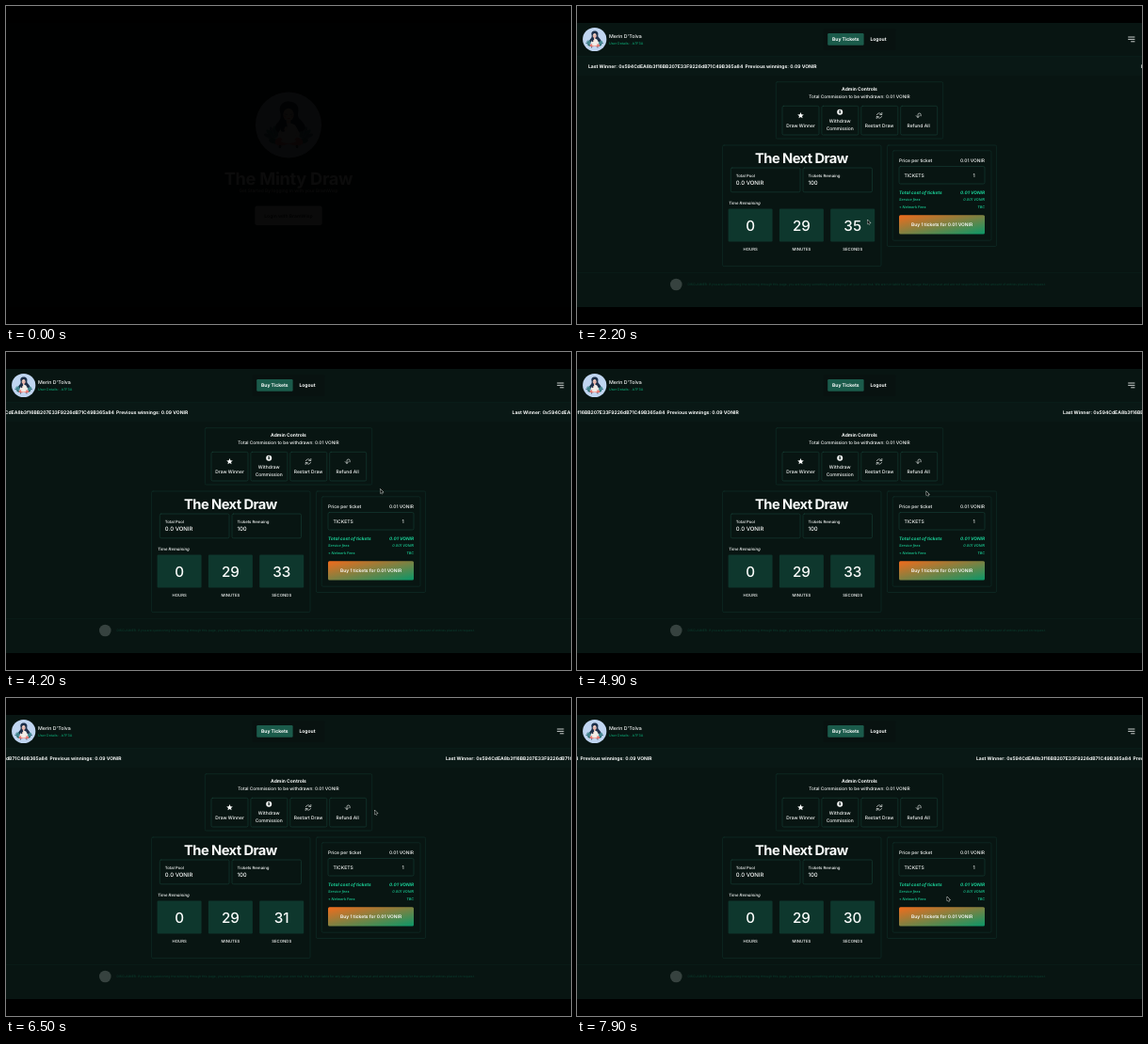
Write an HTML page with a canvas that moves like this. It is 600 by 338 pixels and loops after 8000 ms.

```html
<!DOCTYPE html>
<html lang="en">
<head>
<meta charset="utf-8">
<title>The Minty Draw</title>
<style>
html, body { margin: 0; width: 100%; height: 100%; overflow: hidden; background: #000; }
canvas { display: block; width: 600px; height: 338px; }
</style>
</head>
<body>
<canvas id="stage"></canvas>
<script>
const W = 600, H = 338, LOOP = 8000, SWITCH = 1800;
const cv = document.getElementById('stage');
const c = cv.getContext('2d');
const dpr = window.devicePixelRatio || 1;
cv.width = W * dpr;
cv.height = H * dpr;

const COIN = 'VONIR';
const WINNER = 'Last Winner: 0x594CdEA8b3f16BB207E33F9226dB71C49B365a84';
const PREVIOUS = 'Previous winnings: 0.09 ' + COIN;
const NOTE = 'DISCLAIMER: If you are questioning the winning through this page, you are buying something and playing it at ' +
  'your own risk. We are not liable for any usage that you have and are not responsible for the amount of entries placed on request.';
const WHITE = '#f9fbfa', LINE = '#10322a', EDGE = '#174036', GREEN = '#1ad097', BG = '#081512';

// Cursor stops: time, x, y
const STOPS = [
  [0, 309, 279], [900, 308, 241.5], [1400, 308.5, 227.5], [2300, 308.5, 227.5],
  [3600, 396, 149], [4200, 397.5, 146], [5500, 350, 150], [5700, 350, 150],
  [6500, 391.5, 119.5], [7800, 393, 211.5], [8000, 393, 211.5]
];

const clamp = v => Math.max(0, Math.min(1, v));
const smooth = v => v * v * (3 - 2 * v);

function text(s, x, y, size, { weight = 500, color = WHITE, align = 'left', italic = false, tight = 0 } = {}) {
  c.font = `${italic ? 'italic ' : ''}${weight} ${size}px Inter, sans-serif`;
  c.letterSpacing = `${-tight * size}px`;
  c.fillStyle = color;
  c.textAlign = align;
  c.textBaseline = 'alphabetic';
  c.fillText(s, x, y + size * 0.364);
}

function box(x, y, r, b, { fill, line, radius = 1.5, width = 0.6 } = {}) {
  c.beginPath();
  c.roundRect(x, y, r - x, b - y, radius);
  if (fill) { c.fillStyle = fill; c.fill(); }
  if (line) { c.strokeStyle = line; c.lineWidth = width; c.stroke(); }
}

function oval(x, y, rx, ry, color, turn = 0) {
  c.fillStyle = color;
  c.beginPath();
  c.ellipse(x, y, rx, ry, turn, 0, Math.PI * 2);
  c.fill();
}

function shape(path, color) {
  c.fillStyle = color;
  c.fill(new Path2D(path));
}

function stroke(path, color, width) {
  c.strokeStyle = color;
  c.lineWidth = width;
  c.lineCap = c.lineJoin = 'round';
  c.stroke(new Path2D(path));
}

function plant(side) {
  c.save();
  c.scale(side, 1);
  for (let i = 0; i < 5; i++) {
    const a = -0.3 + i * 0.36;
    oval(14 + Math.sin(a) * 7, 16 - Math.cos(a) * 9, 2.1, 6.4, i % 2 ? '#2f8583' : '#3b6d86', a);
  }
  for (let i = 0; i < 4; i++) {
    const a = i * 0.4;
    stroke(`M13 17L${13 + Math.sin(a) * 11} ${17 - Math.cos(a) * 13}`, '#8cc4be', 0.5);
  }
  oval(16, 17, 5, 2.6, '#27706f', -0.3);
  c.restore();
}

// Seated figure in a round picture, 35 units in radius
function portrait(x, y, r) {
  c.save();
  c.translate(x, y);
  c.scale(r / 35, r / 35);
  oval(0, 0, 35, 35, '#c3d7f2');
  c.beginPath();
  c.arc(0, 0, 35, 0, Math.PI * 2);
  c.clip();
  c.fillStyle = '#aac4e8';
  for (let j = -12; j <= 12; j++)
    for (let i = -12; i <= 12; i++)
      c.fillRect(i * 3 + (j % 2) * 1.5, j * 3, 0.9, 0.9);
  plant(-1);
  plant(1);
  shape('M-9 -14C-11 -22 -4 -26 1 -25C9 -25 12 -18 10 -12C9 -7 15 -5 17 0C20 5 14 8 10 7L-8 8C-16 8 -15 0 -11 -3C-8 -6 -8 -10 -9 -14Z', '#1d2f49');
  oval(0, -2, 2.4, 5, '#eeb9aa');
  oval(0, -11, 5.6, 6.8, '#f3cabd');
  shape('M-7 -10C-6 -18 -2 -19 2 -18C5 -17 7 -14 7 -9C10 -14 8 -21 1 -22C-6 -22 -9 -16 -7 -10Z', '#1d2f49');
  oval(-4, -9, 1.4, 1, '#ea8d88');
  oval(4, -9, 1.4, 1, '#ea8d88');
  stroke('M-4 -11.5L-1.6 -11M2 -11L4 -11.5', '#33405a', 0.6);
  stroke('M-0.9 -7L1.3 -7', '#d8514f', 0.9);
  shape('M-6 0Q0 -4 7 0L12 9L10 18L-10 18L-11 9Z', '#f3eee9');
  stroke('M-7 3Q-10 10 -3 15M8 3Q11 10 4 15', '#d8d3d3', 0.8);
  oval(-5, 2, 3.4, 5.5, '#1d2f49', 0.3);
  oval(-3, 4, 1.5, 2.5, '#f2c6b8', 0.4);
  shape('M-9 13Q-16 15 -14 20Q-10 24 0 20Q11 24 15 20Q17 15 9 13Q4 18 0 18Q-4 18 -9 13Z', '#e57770');
  oval(0, 17, 8, 2.6, '#f1e6df');
  oval(-9, 23, 1.4, 1.8, '#333e50', 0.3);
  oval(9, 23, 1.4, 1.8, '#333e50', -0.3);
  c.restore();
}

function login() {
  portrait(300, 126.5, 35);
  text('The Minty Draw', 300, 183.6, 18.2, { weight: 700, align: 'center', tight: 0.015 });
  text('Get Started By logging in with your BramWisp', 300, 196.6, 4.85, { align: 'center' });
  box(264.3, 212.6, 335.7, 233, { fill: '#f3eff0', radius: 2.5 });
  text('Login with BramWisp', 300, 222.9, 5, { weight: 700, color: '#14201e', align: 'center' });
}

function header() {
  portrait(18.7, 35.5, 12.6);
  text("Merin D'Tolva", 34, 32.5, 5.25);
  text('User Details: ..b7F3A', 34, 39.6, 3.6, { color: '#0c9a6b' });
  box(261.5, 24.3, 338.5, 47, { fill: '#081210' });
  box(266.2, 29, 304.6, 41.8, { fill: '#1b5b4b', radius: 1.2 });
  text('Buy Tickets', 285.3, 35.5, 5, { weight: 700, align: 'center' });
  text('Logout', 320, 35.5, 5, { weight: 700, align: 'center' });
  stroke('M585.6 33H592M585.6 35.4H592M588.6 37.8H592', WHITE, 0.8);
}

function marquee(t) {
  c.fillStyle = '#091815';
  c.fillRect(0, 53.5, W, 20.5);
  const x = 12 - (t - 2200) * 0.0307;
  for (const start of [x, x + 587]) {
    text(WINNER, start, 64.2, 5, { weight: 700 });
    text(PREVIOUS, start + 166.5, 64.2, 5, { weight: 700 });
  }
}

function star(x, y, r) {
  c.beginPath();
  for (let i = 0; i < 10; i++) {
    const a = i * Math.PI / 5 - Math.PI / 2, d = i % 2 ? r * 0.45 : r;
    c.lineTo(x + Math.cos(a) * d, y + Math.sin(a) * d);
  }
  c.closePath();
  c.fillStyle = WHITE;
  c.fill();
}

function admin() {
  const mid = { align: 'center' };
  box(211.3, 80.7, 388.7, 141, { line: LINE });
  text('Admin Controls', 300, 88.4, 5, { weight: 700, align: 'center' });
  text('Total Commission to be withdrawn: 0.01 ' + COIN, 300, 96, 4.8, mid);
  for (let i = 0; i < 4; i++) {
    const x = 218 + i * 41.9;
    box(x, 106.3, x + 39, 137, { line: EDGE });
  }
  star(237.5, 116.5, 3.5);
  text('Draw Winner', 237.5, 126.7, 4.95, mid);
  oval(279.2, 112.7, 3, 3, WHITE);
  text('$', 279.2, 112.7, 4.4, { weight: 700, color: '#0b1a17', align: 'center' });
  text('Withdraw', 279.2, 122.4, 4.95, mid);
  text('Commission', 279.2, 129.9, 4.95, mid);
  stroke('M318.4 115.7A2.7 2.7 0 0 1 323.3 115.2M323.8 113.4V115.5H321.7M323.6 117.3A2.7 2.7 0 0 1 318.7 117.8M318.2 119.6V117.5H320.3', WHITE, 0.6);
  text('Restart Draw', 321.1, 126.7, 4.95, mid);
  stroke('M360.2 116.6L362 118.5L363.8 116.6M362 118.4V115.6A1.6 1.6 0 0 1 365.2 115.6V116.8', WHITE, 0.6);
  text('Refund All', 362.6, 126.7, 4.95, mid);
}

function draw(t) {
  box(154.6, 148, 323, 276.6, { line: LINE });
  text('The Next Draw', 238.4, 162, 14.7, { weight: 700, align: 'center', tight: 0.037 });
  box(163.3, 172, 237, 197.8, { line: EDGE });
  box(240, 172, 313.5, 197.8, { line: EDGE });
  text('Total Pool', 168.8, 180.3, 4.3);
  text('0.0 ' + COIN, 168.8, 187.9, 6);
  text('Tickets Remaing', 245.5, 180.3, 4.3);
  text('100', 245.5, 187.9, 6);
  text('Time Remaining', 161, 209.6, 4.4, { italic: true });
  const left = 35 - Math.floor((t - 2050) / 1000);
  [['0', 'HOURS'], ['29', 'MINUTES'], [left, 'SECONDS']].forEach(([n, label], i) => {
    const x = 160.6 + i * 54.3;
    box(x, 215.6, x + 47, 250.4, { fill: '#0e372d', radius: 1.2 });
    text(String(n), x + 23.5, 233.2, 15.2, { align: 'center' });
    text(label, x + 23.5, 258.5, 4.3, { align: 'center' });
  });
}

function row(a, b, y, size, style = {}) {
  text(a, 342, y, size, style);
  text(b, 433, y, size, { ...style, align: 'right' });
}

function tickets() {
  box(329.4, 148, 445.6, 255.5, { line: LINE });
  box(335.2, 153.8, 440, 249.2, { line: LINE });
  row('Price per ticket', '0.01 ' + COIN, 164.2, 4.9);
  box(342, 170.5, 433, 189, { line: EDGE });
  text('TICKETS', 347.4, 179.8, 5);
  text('1', 421.7, 179.8, 5.2, { align: 'center' });
  row('Total cost of tickets', '0.01 ' + COIN, 198, 4.75, { color: GREEN, weight: 700, italic: true });
  row('Service fees', '0.001 ' + COIN, 206, 3.8, { color: GREEN, italic: true });
  row('+ Network Fees', 'TBC', 213.6, 3.8, { color: GREEN, italic: true });
  // Corner to corner, level along the other diagonal
  const g = c.createLinearGradient(383.1, 213, 391.9, 251.8);
  g.addColorStop(0, '#f26c1c');
  g.addColorStop(1, '#0a9768');
  box(342, 222.2, 433, 242.6, { fill: g });
  text('Buy 1 tickets for 0.01 ' + COIN, 387.6, 232.6, 4.9, { weight: 600, align: 'center' });
}

function dashboard(t) {
  header();
  marquee(t);
  admin();
  draw(t);
  tickets();
  c.fillStyle = '#0b211c';
  for (const y of [53, 283]) c.fillRect(0, y, W, 0.6);
  oval(105.3, 296, 6.3, 6.3, '#36423f');
  text(NOTE, 117.5, 296, 3.35, { color: '#0b3a2c' });
}

function cursor(t) {
  let i = 1;
  while (i < STOPS.length - 1 && t > STOPS[i][0]) i++;
  const [t0, x0, y0] = STOPS[i - 1], [t1, x1, y1] = STOPS[i];
  const k = smooth(clamp((t - t0) / (t1 - t0)));
  c.save();
  c.translate(x0 + (x1 - x0) * k, y0 + (y1 - y0) * k);
  const arrow = 'M0 0V4.2L1 3.3L1.7 4.9L2.4 4.6L1.7 3.1H3Z';
  stroke(arrow, '#e4e8e6', 0.7);
  shape(arrow, '#101614');
  c.restore();
}

function frame(now) {
  const t = now % LOOP;
  c.setTransform(dpr, 0, 0, dpr, 0, 0);
  c.textRendering = 'geometricPrecision';
  c.fillStyle = BG;
  c.fillRect(0, 0, W, H);
  if (t < SWITCH) login(); else dashboard(t);
  if (t >= 100) cursor(t);
  c.fillStyle = '#000';
  c.fillRect(0, 0, W, 18);
  c.fillRect(0, 320, W, H - 320);
  c.fillStyle = `rgba(0,0,0,${1 - clamp((t + 45) / 1030)})`;
  c.fillRect(0, 0, W, H);
}

const begin = performance.now();
function tick() {
  frame(performance.now() - begin);
  requestAnimationFrame(tick);
}
tick();
</script>
</body>
</html>
```
